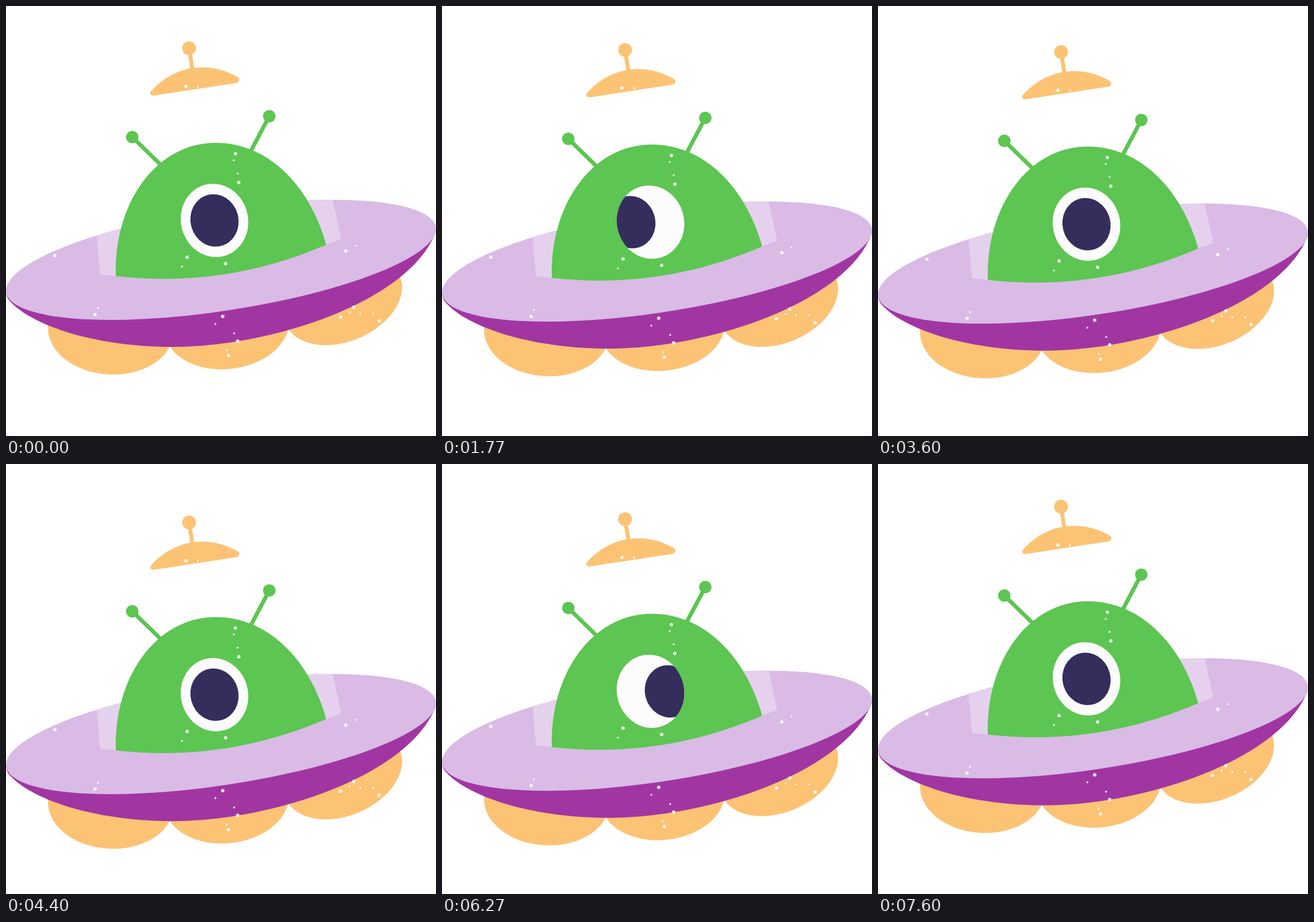
An HTML page with a canvas for the animation above (7660 ms loop, 748x748 px).

```html
<!DOCTYPE html>
<html lang="en">
<head>
<meta charset="utf-8">
<title>Flying saucer</title>
<style>
  html, body { margin: 0; width: 100%; height: 100%; overflow: hidden; background: #fff; }
  canvas { display: block; width: 748px; height: 748px; }
</style>
</head>
<body>
<canvas id="stage" width="748" height="748"></canvas>
<script>
const ctx = document.getElementById('stage').getContext('2d');
const LOOP = 7660, BEAT = 400, POSES = 5, HOLD = 84;

const ORANGE = '#fcc375', GREEN = '#5dc552', LILAC = '#d9bbe6',
      PALE = '#e5d1ed', PURPLE = '#a136a2', INK = '#352d5c';

// Shapes
const oval = (x, y, rx, ry, deg = 0) => {
  const p = new Path2D();
  p.ellipse(x, y, rx, ry, deg * Math.PI / 180, 0, Math.PI * 2);
  return p;
};
const rim = 'C440 465.5 320 484.5 191 470';
const dome = new Path2D(`M191 470 C187 343 261 238 365 238 C453 238 527 308 557 415.5 ${rim}Z`);
const glass = new Path2D(`M568 300 V337 Q574 362 583 405 L557 415.5 ${rim} L164 467 Q159 430 158 395 V300Z`);
const hull = new Path2D('M0 494 Q0 503 4 510 C38 553 150 593 290 593 C462 593 703 514 748 392 L374 440Z');
const cap = new Path2D('M252 148.5 C292 103 352 95 402 123 Q406 125.5 406 128.5 Q405 133 400 134 ' +
  'L259 155.5 Q253 156.5 251.5 153.5 Q250.5 151 252 148.5Z');
const disc = oval(374, 441.5, 378, 88.8, -8.62);
const eye = oval(362.7, 373, 58.4, 64.1, -15);
const pods = [
  oval(182, 564, 109, 77, 3.5),
  oval(384, 557, 108.3, 74.5, -6.3),
  oval(586, 512, 107.7, 71.4, -23)
];

// Each bright speck gets a smaller companion nearby
function makeSpecks() {
  let seed = 7;
  const rand = (lo, hi) => {
    seed = seed * 16807 % 2147483647;
    return lo + (hi - lo) * seed / 2147483647;
  };
  const bright = [[313, 140], [399, 257], [405, 307], [315, 437], [382, 448], [85, 434], [155, 537],
    [377, 540], [387, 608], [403, 583], [591, 426], [605, 524], [582, 541], [649, 548]];
  const specks = new Path2D();
  for (const [x, y] of bright) {
    const angle = rand(0, Math.PI * 2), gap = rand(9, 22);
    specks.addPath(oval(x, y, 3, 3));
    specks.addPath(oval(x + gap * Math.cos(angle), y + gap * Math.sin(angle), 1.7, 1.7));
  }
  return specks;
}
const specks = makeSpecks();

// Drawing helpers
const fill = (path, color) => { ctx.fillStyle = color; ctx.fill(path); };

function clipped(mask, path, color) {
  ctx.save();
  ctx.clip(mask);
  fill(path, color);
  ctx.restore();
}

function antenna(x, y, r, baseX, baseY, color) {
  ctx.strokeStyle = color;
  ctx.lineWidth = 7;
  ctx.beginPath();
  ctx.moveTo(x, y);
  ctx.lineTo(baseX, baseY);
  ctx.stroke();
  fill(oval(x, y, r, r), color);
}

// Motion
const ease = (u, from, to) => {
  const p = Math.min(1, Math.max(0, (u - from) / (to - from)));
  return (1 - Math.cos(Math.PI * p)) / 2;
};
const gaze = u => -34.5 * ease(u, .2, .3) + 66.5 * ease(u, .45, .55) - 32 * ease(u, .7, .8);
const poseAt = ms => Math.floor(ms / BEAT) * POSES + Math.floor(ms % BEAT / HOLD);

function draw(pose) {
  const bob = 22.44 * (1 - Math.cos(pose / 24 * Math.PI * 2));
  const look = gaze(pose % 48 / 48);

  ctx.fillStyle = '#fff';
  ctx.fillRect(0, 0, 748, 748);
  ctx.save();
  ctx.translate(0, bob);

  pods.forEach(p => fill(p, ORANGE));
  fill(hull, PURPLE);
  fill(disc, LILAC);
  clipped(disc, glass, PALE);

  antenna(219.7, 228, 10.8, 270, 277, GREEN);
  antenna(458, 191.7, 10.8, 426, 252, GREEN);
  fill(dome, GREEN);
  fill(eye, '#fcfcfc');
  clipped(eye, oval(362.7 + look, 373, 41.7, 45.8, -15), INK);

  antenna(318.5, 73.5, 12, 324.5, 112, ORANGE);
  fill(cap, ORANGE);
  fill(specks, 'rgba(255,255,255,.85)');
  ctx.restore();
}

const start = performance.now();
function tick() {
  draw(poseAt((performance.now() - start) % LOOP));
  requestAnimationFrame(tick);
}
tick();
</script>
</body>
</html>
```
